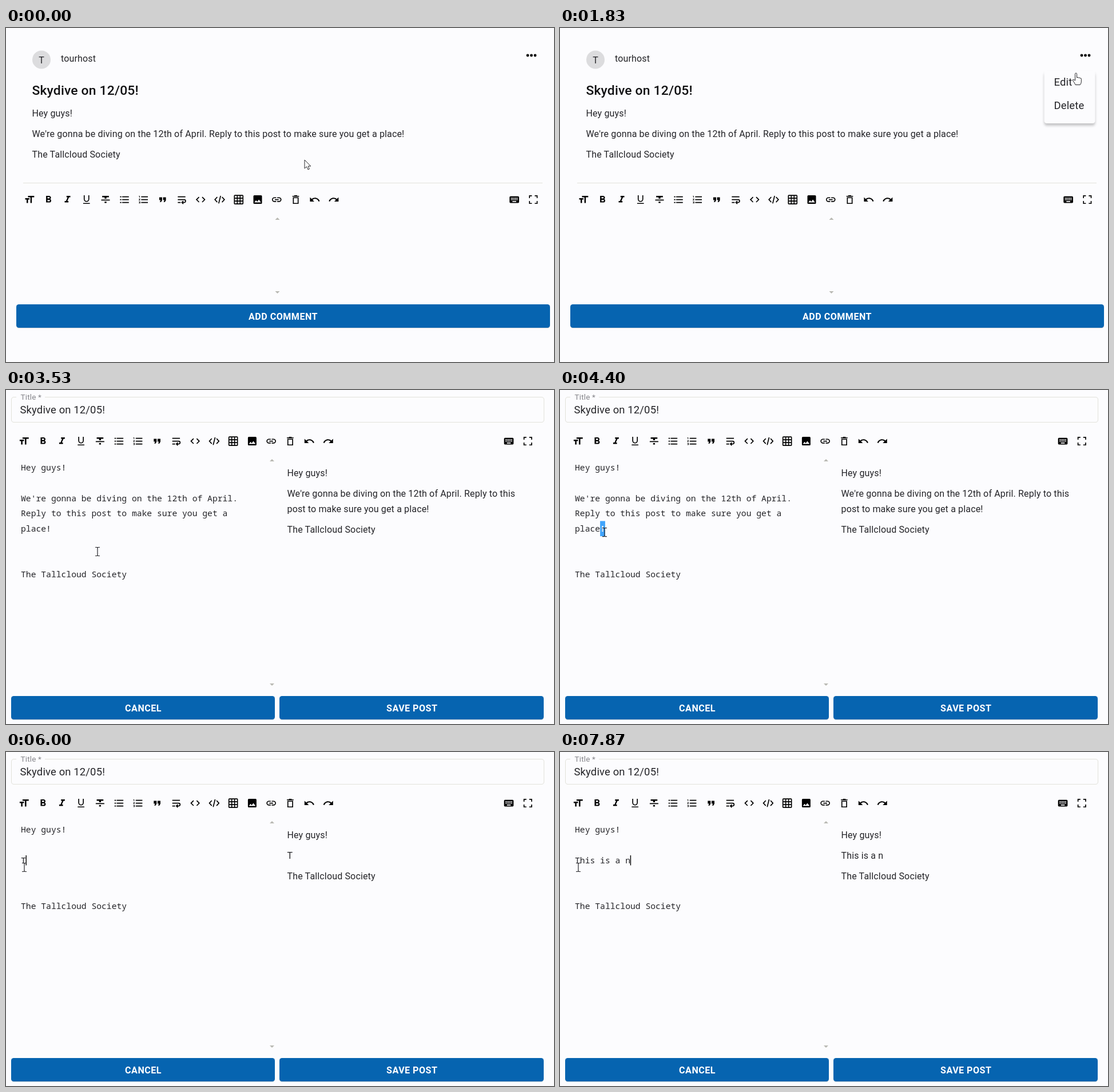
Write an HTML page that moves like this. It is 958 px wide and 585 px high and loops after 8 s.

```html
<!DOCTYPE html>
<html lang="en">
<head>
<meta charset="utf-8">
<title>Editing a post</title>
<style>
  html, body { margin: 0; width: 100%; height: 100%; overflow: hidden; background: #fcfcfe; }
  svg { display: block; width: 100%; height: 100%; }
  text { font: 16px Roboto, sans-serif; letter-spacing: .15px; fill: #242428; white-space: pre; }
  .large { font-size: 18.4px; letter-spacing: .17px; }
  .heading { font-size: 22.9px; font-weight: 500; letter-spacing: .17px; fill: #101012; }
  .label { font-size: 13.5px; fill: #85858a; }
  .button { font-size: 16.1px; font-weight: 600; letter-spacing: .46px; fill: #fff; text-anchor: middle; }
  .mono text { font: 14.7px "Noto Sans Mono", "DejaVu Sans Mono", monospace; letter-spacing: 0; }
  .white text { fill: #fff; font-weight: 600; }
  .blue { fill: #0664b0; filter: drop-shadow(0 1px .5px rgba(0, 0, 0, .15)); }
  .line { fill: none; stroke: #e2e2da; }
  .arrow { fill: #b8b8b2; }
  .pointer { fill: #fff; stroke: #26262a; }
  .paper { fill: #fcfcfe; filter: drop-shadow(0 4px 2px rgba(0, 0, 0, .22)); }
</style>
</head>
<body>
<svg viewBox="0 0 958 585">
  <defs>
    <g id="bar"></g>
    <clipPath id="clip"><path id="clipShape"/></clipPath>
  </defs>

  <g id="post">
    <circle cx="62" cy="55.5" r="16" fill="#dcdcde"/>
    <text x="62" y="61.5" text-anchor="middle">T</text>
    <text x="96" y="59">tourhost</text>
    <g>
      <circle cx="912" cy="48" r="2.4"/><circle cx="918.5" cy="48" r="2.4"/><circle cx="925" cy="48" r="2.4"/>
    </g>
    <text class="heading" x="45.5" y="117">Skydive on 12/05!</text>
    <text x="45.5" y="155">Hey guys!</text>
    <text x="45.5" y="191">We're gonna be diving on the 12th of April. Reply to this post to make sure you get a place!</text>
    <text x="45.5" y="227">The Tallcloud Society</text>
    <path class="line" d="M30 271.5H938"/>
    <use href="#bar"/>
    <path class="arrow" d="M470.5 336l4-4 4 4zM470.5 461l4 4 4-4z"/>
    <rect class="blue" x="18" y="484" width="933" height="41" rx="4.5"/>
    <text class="button" x="484.5" y="510.7">ADD COMMENT</text>
    <g id="menu">
      <rect class="paper" x="846.5" y="75" width="89" height="92" rx="4.5"/>
      <text class="large" x="863.5" y="101">Edit</text>
      <text class="large" x="863.5" y="142.3">Delete</text>
    </g>
  </g>

  <g id="editor">
    <path class="line" d="M18 12.5H14q-4.5 0-4.5 4.5V52q0 4.5 4.5 4.5H936q4.5 0 4.5-4.5V17q0-4.5-4.5-4.5H68"/>
    <text class="label" x="25.5" y="16.5">Title *</text>
    <text class="large" x="24.5" y="40.5">Skydive on 12/05!</text>
    <use href="#bar" transform="translate(-9.6 -211)"/>
    <path class="arrow" d="M461 125l4-4 4 4zM461 514l4 4 4-4z"/>
    <rect class="blue" x="9" y="536" width="461" height="41" rx="4.5"/>
    <rect class="blue" x="478" y="536" width="462" height="41" rx="4.5"/>
    <text class="button" x="240" y="562.8">CANCEL</text>
    <text class="button" x="709.7" y="562.8">SAVE POST</text>
    <g class="mono"><text x="26" y="141.3">Hey guys!</text></g>
    <text x="491.5" y="151.3">Hey guys!</text>

    <g id="before">
      <path id="selection" fill="#40a4fc"/>
      <g class="mono" id="lines"></g>
      <g class="mono white" id="whiteLines" clip-path="url(#clip)"></g>
      <g class="mono"><text x="26" y="328">The Tallcloud Society</text></g>
      <text x="491.5" y="187.3">We're gonna be diving on the 12th of April. Reply to this</text>
      <text x="491.5" y="214">post to make sure you get a place!</text>
      <text x="491.5" y="249.5">The Tallcloud Society</text>
    </g>
    <g id="after">
      <g class="mono">
        <text id="typed" x="26" y="194.5"></text>
        <text x="26" y="274.7">The Tallcloud Society</text>
      </g>
      <rect id="caret" y="181" width="1.4" height="17.5"/>
      <text id="preview" x="491.5" y="187.3"></text>
      <text x="491.5" y="223">The Tallcloud Society</text>
    </g>
  </g>

  <g id="cursor">
    <path id="arrow" class="pointer" d="M0 0V15L3.5 11.8 6 17l2.3-1L6.1 11h4.6z"/>
    <path id="hand" class="pointer" d="M-1.5 13V1.5a1.5 1.5 0 0 1 3 0V8q1.5-1.5 3 .3 1.6-1 2.8.6 2-.6 2 1.4V15q0 3-2 5.5H-1q-1-3-4.5-7.5-.5-2.5 1.8-1.5z"/>
    <path id="beam" fill="none" stroke="#26262a" stroke-width="1.2" d="M-4-7.5h3l1 1 1-1h3M0-6.5v13M-4 7.5h3l1-1 1 1h3"/>
  </g>
</svg>
<script>
const $ = id => document.getElementById(id);
const show = (id, on) => $(id).setAttribute('visibility', on ? 'inherit' : 'hidden');

// Toolbar icons on a 24 unit grid; a leading "-" marks an outline
const undo = 'M12.5 8c-2.65 0-5.05 1-6.9 2.6L2 7v9h9l-3.6-3.6c1.4-1.2 3.1-1.9 5.1-1.9 3.5 0 6.5 2.3 7.6 5.5l2.4-.8C21 11 17 8 12.5 8z';
const icons = [
  'M9 4v3h5v12h3V7h5V4zM3 12h3v7h3v-7h3V9H3z',
  'M15.6 10.8c1-.7 1.6-1.8 1.6-2.8 0-2.3-1.7-4-4-4H7v14h7c2.1 0 3.7-1.7 3.7-3.8 0-1.5-.8-2.8-2.1-3.4zM10 6.5h3a1.5 1.5 0 0 1 0 3h-3zm3.5 9H10v-3h3.5a1.5 1.5 0 0 1 0 3z',
  'M10 4v3h2.2l-3.4 8H6v3h8v-3h-2.2l3.4-8H18V4z',
  '-M7.2 3v8a4.8 4.8 0 0 0 9.6 0V3M5 20h14',
  'M10 19h4v-3h-4zM5 4v3h5v3h4V7h5V4zM3 14h18v-2H3z',
  '-M7 6h14M7 12h14M7 18h14M2.5 6h3M2.5 12h3M2.5 18h3',
  'M7 5h14v2H7zM7 11h14v2H7zM7 17h14v2H7zM2 4h2v4H3V5H2zM2 10h3v1l-1.8 2H5v1H2v-1l1.8-2H2zM2 16h3v4H2v-1h2v-.5H3v-1h1V17H2z',
  'M6 17h3l2-4V7H5v6h3zM14 17h3l2-4V7h-6v6h3z',
  '-M4 6h16M4 18h6M4 12h13.3a3 3 0 0 1 0 6H13M15.5 15l-3 3 3 3',
  '-M8.7 6.7 3.4 12l5.3 5.3M15.3 6.7l5.3 5.3-5.3 5.3',
  '-M7 6.5 2 12l5 5.5M17 6.5l5 5.5-5 5.5M14 4l-4 16',
  'M4 2h16q2 0 2 2v16q0 2-2 2H4q-2 0-2-2V4q0-2 2-2z' +
    [4, 10, 16].map(x => [4, 10, 16].map(y => `M${x} ${y}h4v4h-4z`).join('')).join(''),
  'M21 19V5a2 2 0 0 0-2-2H5a2 2 0 0 0-2 2v14a2 2 0 0 0 2 2h14a2 2 0 0 0 2-2zM8.5 13.5l2.5 3 3.5-4.5 4.5 6H5z',
  '-M11 8H7a4 4 0 0 0 0 8h4M13 8h4a4 4 0 0 1 0 8h-4M8 12h8',
  '-M7 8h10v12H7zM5 5h14M9 4h6',
  undo, undo,
  'M20 5H4a2 2 0 0 0-2 2v10a2 2 0 0 0 2 2h16a2 2 0 0 0 2-2V7a2 2 0 0 0-2-2zM8 15h8v2H8z' +
    [5, 8, 11, 14, 17].map(x => `M${x} 8h2v2h-2zM${x} 11h2v2h-2z`).join(''),
  '-M4 9V4h5M15 4h5v5M20 15v5h-5M9 20H4v-5'
];
const REDO = 16, RIGHT_SIDE = 17;
$('bar').innerHTML = icons.map((icon, i) => {
  const paint = icon[0] === '-' ? 'fill="none" stroke="#000" stroke-width="2"' : 'fill-rule="evenodd"';
  const x = i < RIGHT_SIDE ? 41 + 33.25 * i : 888.6 + 33.25 * (i - RIGHT_SIDE);
  const flip = i === REDO ? -1 : 1;
  return `<path transform="translate(${x} 300.6) scale(${.833 * flip} .833) translate(-12 -12)" d="${icon.replace(/^-/, '')}" ${paint}/>`;
}).join('');

const LEFT = 26, CHAR = 8.82, TOP = 176.3, ROW = 26.6;
const lines = ["We're gonna be diving on the 12th of April.", 'Reply to this post to make sure you get a', 'place!'];
$('lines').innerHTML = $('whiteLines').innerHTML =
  lines.map((s, i) => `<text x="${LEFT}" y="${194.5 + ROW * i}">${s}</text>`).join('');

const MENU_OPEN = 1130, EDIT = 2070, DRAG = 4270, REPLACE = 6000, LOOP = 8000;
const phrase = 'This is a n';
const keyTimes = [REPLACE, 6370, 6570, 6700, 6800, 7000, 7100, 7200, 7330, 7470, 7830];

// time, x, y
const path = [
  [30, 522, 231], [860, 916, 50], [1300, 916, 50], [1670, 902, 79], [1900, 902, 79], [2250, 895, 85],
  [2530, 895, 85], [3330, 160, 283], [3600, 160, 283], [4080, 84, 256], [DRAG, 84, 256], [4830, 40, 206],
  [5000, 40, 206], [5230, 33, 203], [5599, 33, 203], [5600, 32, 202]
];

function cursorAt(t) {
  const i = path.findIndex(p => p[0] > t);
  if (i === 0) return path[0].slice(1);
  if (i < 0) return path[path.length - 1].slice(1);
  const [t0, x0, y0] = path[i - 1], [t1, x1, y1] = path[i];
  const u = (t - t0) / (t1 - t0), e = u * u * (3 - 2 * u);
  return [x0 + (x1 - x0) * e, y0 + (y1 - y0) * e];
}

// Selected area from the pointer to the end of the paragraph
function selectionShape(x, y) {
  const clamp = (v, max) => Math.max(0, Math.min(max, v));
  const row = clamp(Math.floor((y - 9 - TOP) / ROW), 2);
  const col = clamp(Math.round((x - 4 - LEFT) / CHAR), lines[row].length);
  return lines.map((s, i) => {
    if (i < row) return '';
    const from = i === row ? col : 0, to = s.length + (i < 2 ? 2 : 0);
    return `M${LEFT + from * CHAR} ${TOP + i * ROW}h${(to - from) * CHAR}v${ROW}H${LEFT + from * CHAR}z`;
  }).join('');
}

function draw(t) {
  const [x, y] = cursorAt(t);
  const editing = t >= EDIT, replaced = t >= REPLACE;
  show('post', !editing);
  show('editor', editing);
  $('menu').setAttribute('opacity', Math.max(0, Math.min(1, (t - MENU_OPEN) / 180)));
  show('before', editing && !replaced);
  show('after', replaced);

  const shape = t >= DRAG && !replaced ? selectionShape(x, y) : '';
  $('selection').setAttribute('d', shape);
  $('clipShape').setAttribute('d', shape);

  const count = keyTimes.filter(k => k <= t).length;
  $('typed').textContent = $('preview').textContent = phrase.slice(0, count);
  $('caret').setAttribute('x', LEFT - .3 + CHAR * count);
  show('caret', replaced && (t - keyTimes[count - 1]) % 1000 < 500);

  const beam = editing && x < 455 && y > 115;
  const hand = !editing && x > 900 && y < 150;
  show('beam', beam);
  show('hand', hand);
  show('arrow', !beam && !hand);
  $('cursor').setAttribute('transform', `translate(${x} ${y})`);
}

function tick() {
  draw(performance.now() % LOOP);
  requestAnimationFrame(tick);
}
tick();
</script>
</body>
</html>
```
